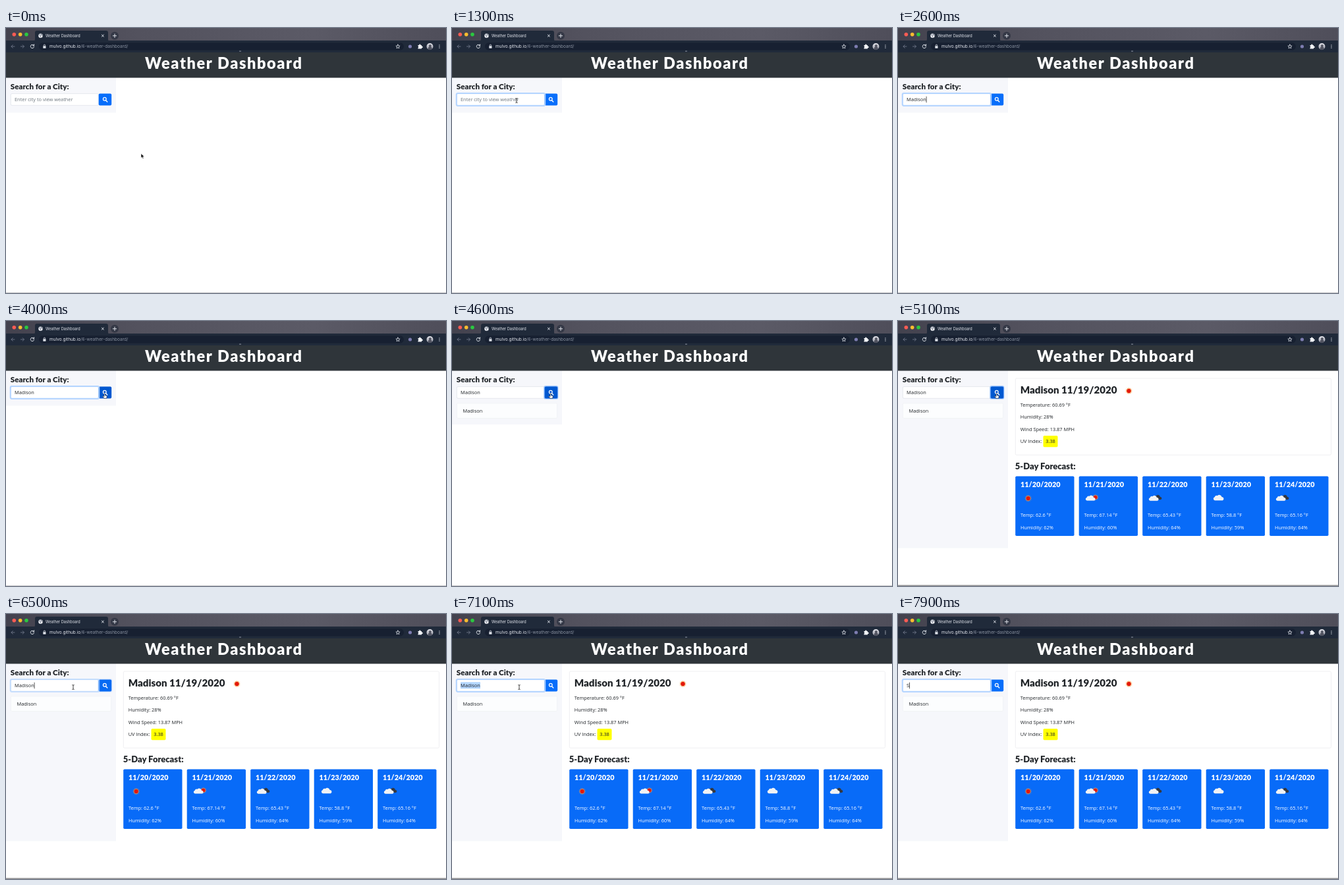
Write an HTML page that moves like this. It is 668 by 402 pixels and loops after 8 s.

```html
<!DOCTYPE html>
<html lang="en">
<head>
<meta charset="utf-8">
<title>Weather Dashboard</title>
<style>
  html, body { margin: 0; width: 100%; height: 100%; overflow: hidden; background: #fff; }
  svg { display: block; width: 668px; height: 402px; }
  text { font: 7.4px "Open Sans", sans-serif; fill: #212529; white-space: pre; }
  .head { font-family: Lato, sans-serif; font-weight: 900; }
  .ui { font-family: Inter, sans-serif; fill: #e4e7ee; }
  .light { fill: #fff; }
  .line { fill: none; stroke: #dfe3ea; stroke-width: 1; stroke-linecap: round; stroke-linejoin: round; }
  .dim { stroke: #687082; }
  .thin { stroke-width: .8; }
</style>
</head>
<body>
<svg viewBox="0 0 668 402">
  <defs>
    <linearGradient id="strip" x2="1" y2="0">
      <stop offset="0" stop-color="#43424e"/><stop offset=".3" stop-color="#53525e"/>
      <stop offset=".7" stop-color="#5b5a66"/><stop offset="1" stop-color="#4f4e5a"/>
    </linearGradient>
    <linearGradient id="photo" x2="0" y2="1">
      <stop offset="0" stop-color="#e1e2e8"/><stop offset="1" stop-color="#9b9daa"/>
    </linearGradient>
    <g id="sun">
      <path id="rays" fill="#f5943c"/>
      <circle r="3.1" fill="#e3170d"/>
    </g>
    <path id="cloud" d="M-6 4a2.6 2.6 0 0 1-.4-5.1A3.2 3.2 0 0 1-2.2-3.2 3.8 3.8 0 0 1 4.4-1.2 2.7 2.7 0 0 1 5.6 4z"/>
  </defs>

  <rect width="668" height="402" fill="#fff"/>
  <rect id="sidebar" y="75" width="167" fill="#f6f7fb"/>

  <g id="browser">
    <rect width="668" height="20" fill="url(#strip)"/>
    <rect y="19" width="668" height="18" fill="#202a3a"/>
    <path d="M41 20q3 0 3-3V7q0-3 3-3h105q3 0 3 3v10q0 3 3 3z" fill="#202a3a"/>
    <circle cx="12.3" cy="9.7" r="2.8" fill="#ff5c54"/>
    <circle cx="21.7" cy="9.7" r="2.8" fill="#fdbd2f"/>
    <circle cx="31" cy="9.7" r="2.8" fill="#2ac940"/>
    <circle cx="52.5" cy="11.7" r="3.2" fill="#eef0f4"/>
    <path d="M50.4 10.2l2 1-.5 1.7 1.2 1M53.5 9.2l-.3 1.2 1.8.6" class="line thin" style="stroke:#4c566a"/>
    <text class="ui" x="60" y="13.7" style="font-size:5.6px">Weather Dashboard</text>
    <circle cx="165" cy="11.8" r="6" fill="#343846"/>
    <path class="line" d="M145.4 10.2l3 3m0-3l-3 3M162.3 11.8h5.4m-2.7-2.7v5.4"/>
    <path class="line dim" d="M13 28H8m2.3-2.3L8 28l2.3 2.3M22.5 28h5m-2.3-2.3l2.3 2.3-2.3 2.3"/>
    <path class="line" d="M42.2 26.4a2.7 2.7 0 1 0 .4 2.2M42.6 24.9v2h-2"/>
    <rect x="50" y="22.3" width="554" height="11.4" rx="5.7" fill="#172031"/>
    <rect x="56.3" y="27.3" width="4.2" height="3.4" rx=".5" fill="#dfe3ea"/>
    <path class="line thin" d="M57.2 27.3v-1a1.2 1.2 0 0 1 2.4 0v1"/>
    <text class="ui" x="66" y="30.2" style="font-size:6.5px">mulvo.github.io<tspan fill="#8c94a3">/6-weather-dashboard/</tspan></text>
    <path class="line thin" d="M595 25l.9 2 2.2.2-1.7 1.5.5 2.2-1.9-1.2-1.9 1.2.5-2.2-1.7-1.5 2.2-.2z"/>
    <circle cx="613.5" cy="28" r="2.6" fill="#7d7db0"/>
    <path d="M625.5 26h1.7a1.2 1.2 0 1 1 2.3 0h1.5v1.8a1.2 1.2 0 1 1 0 2.2v1.5h-5.5v-1.7a1.2 1.2 0 0 0 0-2.2z" fill="#f2f4f7"/>
    <circle cx="643.5" cy="28" r="5" fill="url(#photo)"/>
    <path d="M640.5 31.9q.3-3 2.1-3.3a2 2 0 1 1 2.6 0q1.6.5 1.7 3.1a5 5 0 0 1-6.4.2z" fill="#515461"/>
    <path d="M658 25.8v.01M658 28v.01M658 30.2v.01" class="line" style="stroke-width:1.3"/>
    <rect y="37" width="668" height="38.5" fill="#2f353a"/>
    <rect x="354" y="34.7" width="3" height=".8" fill="#aab0bb"/>
    <text class="head light" x="211" y="62" style="font-size:23.5px;letter-spacing:1.6px">Weather Dashboard</text>
  </g>

  <text class="head" x="6.8" y="93.2" style="font-size:11.6px">Search for a City:</text>
  <rect id="field" x="7.3" y="99.6" width="133.3" height="17.7" rx="1.7" fill="#fff" stroke-width=".6"/>
  <rect id="buttonRing" x="139.3" y="98.2" width="22" height="20.4" rx="2.6" fill="#8dbcff"/>
  <rect id="button" x="140.7" y="99.5" width="19.5" height="17.9" rx="1.9"/>
  <rect id="inputRing" x="6.4" y="98.7" width="135.1" height="19.5" rx="2.4" fill="none" stroke="#b5d5ff" stroke-width="1.4"/>
  <path d="M151.8 110l2 2" stroke="#fff" stroke-width="1.4" stroke-linecap="round"/>
  <circle cx="149.8" cy="107.8" r="2.4" fill="none" stroke="#fff" stroke-width="1.2"/>
  <rect id="selection" x="13" y="103.3" width="30" height="10" fill="#b3d6ff"/>
  <text id="hint" x="13" y="110.8" style="fill:#6c757d">Enter city to view weather</text>
  <text id="entry" x="13" y="110.8"></text>
  <rect id="caret" y="103.8" width=".7" height="9.4" fill="#111"/>

  <g id="history">
    <rect x="7.3" y="124.7" width="152.3" height="22.8" rx="1.7" fill="#fcfdfe" stroke="#eceef2" stroke-width=".6"/>
    <text x="16.5" y="138.7">Madison</text>
  </g>

  <g id="today">
    <rect x="178.3" y="87" width="479.2" height="116.2" rx="1.7" fill="#fff" stroke="#e8e9ec" stroke-width=".7"/>
    <text class="head" x="185.7" y="110.2" style="font-size:15.1px">Madison 11/19/2020</text>
    <use href="#sun" x="350.5" y="106"/>
    <text x="185.7" y="129.7">Temperature: 60.69 °F</text>
    <text x="185.7" y="148.2">Humidity: 28%</text>
    <text x="185.7" y="166.8">Wind Speed: 13.87 MPH</text>
    <text x="185.7" y="185.3">UV Index:</text>
    <rect x="220.5" y="174" width="22" height="17.3" rx="1.7" fill="#ff0"/>
    <text x="224.2" y="185.3">3.38</text>
    <text class="head" x="177.8" y="224.5" style="font-size:13px">5-Day Forecast:</text>
  </g>
  <g id="forecast"></g>
  <rect id="edge" width="668" height="2"/>

  <g id="pointer">
    <path id="arrow" d="M0 0v6.7l1.6-1.4 1.1 2.5 1.2-.5-1.1-2.5H5z" fill="#000" stroke="#fff" stroke-width=".6"/>
    <path id="ibeam" d="M-1.6-3.5Q0-3.5 0-2.5 0-3.5 1.6-3.5M0-2.5v5M-1.6 3.5Q0 3.5 0 2.5 0 3.5 1.6 3.5" fill="none" stroke="#111" stroke-width=".8"/>
    <path id="hand" d="M-1-3.3q.7-.7 1.3 0v2.6l2 .4q1 .3.9 1.4l-.5 2.700h-3.700L-3.200 1q.2-1.200 1.300-.4l.9.7z" fill="#fff" stroke="#000" stroke-width=".5"/>
  </g>
</svg>

<script>
const LOOP = 8000, TICK = 100;
const el = {};
document.querySelectorAll('[id]').forEach(node => el[node.id] = node);

const show = (node, on) => node.setAttribute('visibility', on ? 'inherit' : 'hidden');
const set = (node, attrs) => Object.entries(attrs).forEach(([k, v]) => node.setAttribute(k, v));
const ramp = (t, from, to) => Math.min(1, Math.max(0, (t - from) / (to - from)));
const ease = p => p * p * (3 - 2 * p);
const within = (t, ...spans) => spans.some(([from, to]) => t >= from && t < to);
const mix = (a, b, p) => `rgb(${a.map((v, i) => Math.round(v + (b[i] - v) * p))})`;

// Pointed rays around the sun disc
el.rays.setAttribute('d', 'M' + Array.from({ length: 24 }, (_, i) => {
  const angle = i * Math.PI / 12, r = i % 2 ? 3 : 5.6;
  return `${(r * Math.cos(angle)).toFixed(2)} ${(r * Math.sin(angle)).toFixed(2)}`;
}).join('L') + 'z');

const cloud = (x, y, scale, fill) =>
  `<use href="#cloud" transform="translate(${x} ${y}) scale(${scale})" fill="${fill}"/>`;
const icons = {
  sun: '<use href="#sun" x="19.5" y="269"/>',
  few: '<use href="#sun" transform="translate(25 267.5) scale(.9)"/>' + cloud(18, 268.8, .95, '#f1f2f4'),
  broken: cloud(23, 267.7, .85, '#343840') + cloud(17.5, 269, .95, '#f1f2f4'),
  cloud: cloud(19.5, 268.2, 1, '#f1f2f4')
};
const days = [
  ['sun', '62.6', 62], ['few', '67.14', 60], ['broken', '65.43', 64], ['cloud', '58.8', 59], ['broken', '65.16', 64]
];
el.forecast.innerHTML = days.map(([icon, temp, humidity], i) => `
  <g transform="translate(${178.2 + i * 96.5} 0)">
    <rect y="235.4" width="89.3" height="90.7" rx="1.8" fill="#086bf8"/>
    <text class="head light" x="7.8" y="252.3" style="font-size:10.8px">11/${20 + i}/2020</text>
    ${icons[icon]}
    <text class="light" x="7.8" y="296.9">Temp: ${temp} °F</text>
    <text class="light" x="7.8" y="315.5">Humidity: ${humidity}%</text>
  </g>`).join('');

function typedText(t) {
  if (t >= 7500) return 'S';
  const count = t < 1600 ? 0 : t < 2100 ? Math.min(2, 1 + Math.floor((t - 1600) / 100))
    : 3 + Math.floor((t - 2100) / 100);
  return 'Madison'.slice(0, count);
}

const moves = [
  { from: [205, 190.5], to: [98, 110], start: 0, end: 600 },
  { from: [98, 110], to: [150, 113.5], start: 3000, end: 3700 },
  { from: [150, 113.5], to: [102, 111], start: 5300, end: 5900 }
];
function pointerAt(t) {
  const move = moves.filter(m => t >= m.start).pop();
  const p = ease(ramp(t, move.start, move.end));
  return move.from.map((v, i) => v + (move.to[i] - v) * p);
}

function drawPointer(t) {
  const [x, y] = pointerAt(t);
  const overRow = y > 99 && y < 118;
  const overButton = overRow && x >= 140.5;
  set(el.pointer, { transform: `translate(${x} ${y})` });
  show(el.pointer, !within(t, [1600, 3100], [7500, LOOP]));
  show(el.hand, overButton);
  show(el.ibeam, overRow && !overButton);
  show(el.arrow, !overRow);
  return overButton;
}

function drawSearch(t, hover) {
  const inputFocus = ramp(t, 700, 1000) - ramp(t, 4300, 4600) + ramp(t, 6300, 6600);
  const buttonFocus = ramp(t, 4300, 4600) - ramp(t, 6300, 6600);
  const text = typedText(t);
  set(el.inputRing, { opacity: inputFocus });
  set(el.field, { stroke: mix([215, 220, 226], [118, 178, 255], inputFocus) });
  set(el.buttonRing, { opacity: buttonFocus });
  set(el.button, { fill: mix([8, 110, 250], [0, 88, 208], hover ? 1 : buttonFocus * .6) });
  el.entry.textContent = text;
  show(el.hint, !text);
  show(el.selection, within(t, [6600, 7500]));
  show(el.caret, within(t, [800, 1300], [1600, 3000], [3500, 4000], [6400, 6600], [7500, LOOP]));
  set(el.caret, { x: 13 + (text ? el.entry.getComputedTextLength() : 0) });
}

function draw(t) {
  drawSearch(t, drawPointer(t));
  const listed = t >= 4500, loaded = t >= 4800, complete = t >= 5100;
  show(el.history, listed);
  show(el.today, loaded);
  show(el.forecast, complete);
  const bottom = complete ? 344.5 : loaded ? 245.5 : listed ? 157 : 128.5;
  set(el.sidebar, { height: bottom - 75 });
  set(el.edge, { y: loaded ? 400.5 : 401.2, fill: loaded ? '#8f8f92' : '#b9babd' });
}

function frame(now) {
  draw(Math.floor(now % LOOP / TICK) * TICK);
  requestAnimationFrame(frame);
}
draw(0);
requestAnimationFrame(frame);
</script>
</body>
</html>
```
